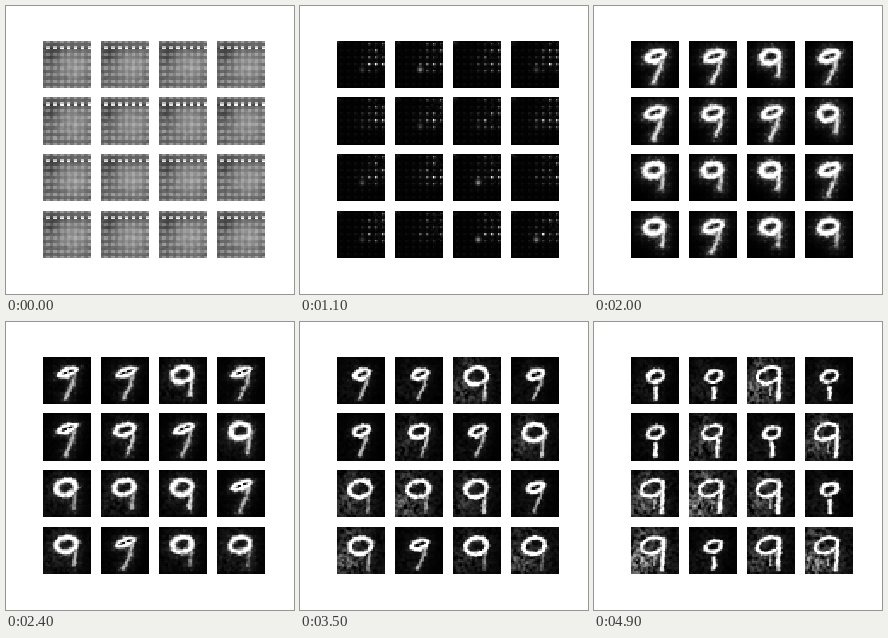
Write an HTML page with a canvas that moves like this. It is 288 by 288 pixels and loops after 5.1 s.

```html
<!DOCTYPE html>
<html lang="en">
<head>
<meta charset="utf-8">
<title>Generated digits</title>
<style>
html, body { margin: 0; width: 100%; height: 100%; overflow: hidden; background: #fff; }
canvas { display: block; width: 100vw; height: 100vh; }
</style>
</head>
<body>
<canvas id="stage" width="288" height="288"></canvas>
<script>
const N = 28, LOOP = 5100, STEP = 100, LAST = 49;
const KINDS = 'sslssmsllllslsll'; // small, large or mixed nine, tile by tile
const WIDTH = { s: 0, m: .5, l: 1 };

const ctx = document.getElementById('stage').getContext('2d');
const cell = document.createElement('canvas');
cell.width = cell.height = N;
const cellCtx = cell.getContext('2d');
const img = cellCtx.createImageData(N, N);

const clamp = v => Math.max(0, Math.min(1, v));
const mix = (a, b, k) => a + (b - a) * k;
const ramp = (f, from, to) => clamp((f - from) / (to - from));
const swell = (f, mid, half) => Math.cos(Math.PI / 2 * Math.min(1, Math.abs(f - mid) / half)) ** 2;
const bump = (x, y, cx, cy, r) => Math.exp(-((x - cx) ** 2 + (y - cy) ** 2) / (r * r));

function rand(a, b, c, d) {
  let h = Math.imul(a + 11, 374761393) ^ Math.imul(b + 7, 668265263) ^
          Math.imul(c + 3, 1274126177) ^ Math.imul(d + 5, 1103515245);
  h = Math.imul(h ^ (h >>> 15), 2246822519);
  h = Math.imul(h ^ (h >>> 13), 3266489917);
  return ((h ^ (h >>> 16)) >>> 0) / 4294967296;
}

// Noise averaged over a 2 by 2 block, so that it clumps
const clump = (x, y, tile, seed) =>
  (rand(x, y, tile, seed) + rand(x + 1, y, tile, seed) +
   rand(x, y + 1, tile, seed) + rand(x + 1, y + 1, tile, seed)) / 4;

// Deconvolution lattice with a period of four cells
const onDot = (x, y) =>
  (x % 4 === 2 ? 1 : x % 4 === 3 ? .45 : .08) * (y % 4 === 1 ? 1 : y % 4 === 2 ? .4 : .06);

function weave(x, y, tile) {
  const px = Math.cos(Math.PI / 2 * (x - 2.5)), py = Math.cos(Math.PI / 2 * (y - 3.5));
  const edge = 1 - bump(x, y, 16, 15, 9);
  let v = .44 + .16 * bump(x, y, 18, 15, 10) - .13 * bump(x, y, 5, 7, 5);
  v += .05 * px + py * (.03 + .07 * edge) + .06 * px * py * edge;
  v += (clump(x, y, 99, 0) - .5) * .1 + (clump(x, y, tile, 0) - .5) * .08;
  const dash = y === 3 ? .2 : y === 4 ? .4 : 0;
  return v + (x % 4 > 1 ? dash : -dash * .4);
}

function faintDots(x, y, tile) {
  const centre = bump(x, y, 15, 13, 6) * (.1 + .3 * rand(tile, 2, 3, 4));
  const corner = .4 * bump(x, y, .5, 0, 2) * rand(x, y, tile, 7);
  return .015 + onDot(x, y) * (.09 + centre) + centre * .25 * clump(x, y, tile, 6) + corner;
}

function sparks(x, y, tile) {
  const side = ramp(x, 13, 22) * ramp(y, 21, 16);
  const row = bump(0, y, 0, 13.3, 2) * ramp(x, 12, 17);
  const blob = rand(tile, 4, 4, 4) ** 2 * bump(x, y, 14.3, 16.5, 1.5);
  const lit = rand(x >> 2, y >> 2, tile, 8) * (side * .9 + row * .8);
  return onDot(x, y) * lit + side * .1 * rand(x, y, tile, 9) ** 3 + blob;
}

// Small nines shrink and drop their tail; large ones open, then grow a stem
function poseAt(tile, f) {
  const w = WIDTH[KINDS[tile]];
  const settle = ramp(f, 20, 28), turn = ramp(f, 28, 41), end = ramp(f, 41, 49);
  const flat = swell(f, 28, 12), gap = swell(f, 30, 17);
  const pick = (small, large) => mix(small, large, w);
  const shift = (rand(tile, 1, 1, 1) - .5) * .6;
  return {
    cx: pick(13.9, 13.2 - end) + shift,
    cy: pick(mix(8.6, 11, turn), mix(9, 10.8, settle) - .4 * end),
    rx: pick(mix(5.3, 3.7, turn) + .9 * end, mix(5.2, 6.2, settle) + .6 * end),
    ry: pick(3.1 - 2 * flat, mix(3.8, 4.7, settle) - .4 * end),
    tilt: -pick(.35, .22 + .13 * end),
    half: mix(2.4, pick(1.6, 1.6), settle) - .2 * end,
    tail: [
      [pick(18 - 4 * end, 18.5) + shift, pick(9 + 9 * end, 7 + 8 * gap)],
      [pick(16.5 - 2.4 * end, 18) + shift, pick(16 + 5 * end, 17.5)],
      [pick(12.7 + 1.2 * end, 17.5) + shift, pick(24, mix(20, 24.5, settle))]
    ],
    tailHalf: mix(1.8, 1.1, settle) + .35 * end,
    tailGain: 1 - gap * pick(.35, .1 + .6 * rand(tile, 3, 1, 1)),
    leg: w * ramp(f, 34, 46),
    soft: mix(2.2, 1.5, settle),
    halo: mix(.5, .2, settle),
    dust: pick(.12, .65) * (.5 + rand(tile, 2, 1, 1)) * ramp(f, 20, 42)
  };
}

function ringDistance(x, y, { cx, cy, rx, ry, tilt }) {
  const c = Math.cos(tilt), s = Math.sin(tilt), dx = x - cx, dy = y - cy;
  const u = dx * c + dy * s, v = dy * c - dx * s;
  const q = Math.hypot(u / rx, v / ry);
  return q < .01 ? Math.min(rx, ry) : Math.abs(q - 1) * Math.hypot(u, v) / q;
}

function lineDistance(x, y, [ax, ay], [bx, by]) {
  const dx = bx - ax, dy = by - ay;
  const k = clamp(((x - ax) * dx + (y - ay) * dy) / (dx * dx + dy * dy));
  return Math.hypot(x - ax - dx * k, y - ay - dy * k);
}

function digit(x, y, tile, f, pose) {
  const n = mix(clump(x, y, tile, 20), clump(x, y, tile, 100 + f), .35);
  const [a, b, c] = pose.tail;
  const ring = ringDistance(x, y, pose) - pose.half;
  const tail = Math.min(lineDistance(x, y, a, b), lineDistance(x, y, b, c)) - pose.tailHalf;
  const leg = lineDistance(x, y, [13.5, 16], [13, 22]) - .8;
  const ink = d => clamp((.6 - d + (n - .5) * 2.5) / pose.soft);
  const near = Math.max(0, Math.min(ring, tail));
  const glow = pose.halo * Math.exp(-near / 2.4) * n * (.7 + onDot(x, y));
  const spread = .12 + .7 * bump(x, y, 5, 20, 9) + .4 * bump(x, y, 8, 3, 6);
  const dust = pose.dust * spread * clamp(n * 2.6 - .8);
  return Math.max(ink(ring), ink(tail) * pose.tailGain, ink(leg) * pose.leg * .7, glow + dust);
}

function shade(x, y, tile, f, pose) {
  if (f <= 6) return mix(faintDots(x, y, tile), weave(x, y, tile), (1 - f / 6) ** 1.6);
  if (f <= 14) return mix(faintDots(x, y, tile), sparks(x, y, tile), ramp(f, 6, 14));
  const grown = ramp(f, 14, 20);
  const v = digit(x, y, tile, f, pose) * grown;
  return grown < 1 ? v + sparks(x, y, tile) * (1 - grown) : v;
}

function draw(f) {
  ctx.fillStyle = '#fff';
  ctx.fillRect(0, 0, 288, 288);
  ctx.imageSmoothingEnabled = false;
  for (let tile = 0; tile < 16; tile++) {
    const pose = poseAt(tile, f);
    for (let y = 0; y < N; y++) for (let x = 0; x < N; x++) {
      const v = Math.round(255 * clamp(shade(x, y, tile, f, pose)));
      img.data.set([v, v, v, 255], (y * N + x) * 4);
    }
    cellCtx.putImageData(img, 0, 0);
    const left = Math.round(36.62 + 58.23 * (tile % 4));
    const top = 34.56 + 56.71 * (tile >> 2), y0 = Math.round(top);
    ctx.drawImage(cell, left, y0, 48, Math.round(top + 47.27) - y0);
  }
}

let shown = -1;
function tick() {
  const f = Math.min(LAST, Math.floor(performance.now() % LOOP / STEP));
  if (f !== shown) draw(shown = f);
  requestAnimationFrame(tick);
}
tick();
</script>
</body>
</html>
```
